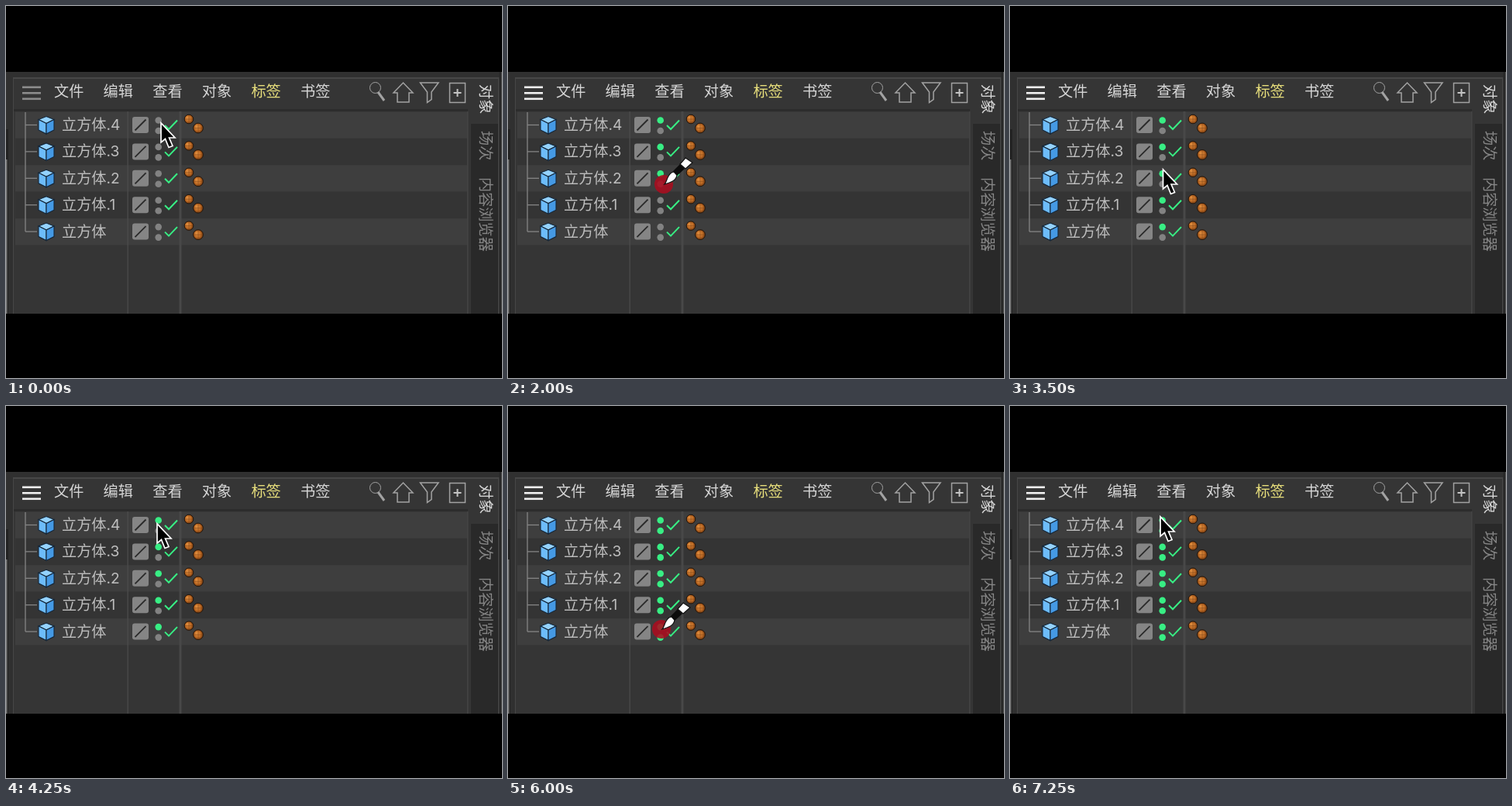
Recreate the animation shown at these times as an HTML page with a canvas. Size 640 px wide and 480 px high, loop 8000 ms.

```html
<!DOCTYPE html>
<html lang="zh-CN">
<head>
<meta charset="utf-8">
<style>
html, body { margin: 0; width: 100%; height: 100%; overflow: hidden; background: #000; }
canvas { display: block; }
</style>
</head>
<body>
<canvas id="stage" width="640" height="480"></canvas>
<script>
const c = document.getElementById('stage').getContext('2d');
const LOOP = 8000, STEP = 250, ROW = 34.4, TOP = 136.5;
const GREEN = '#38ee84', GREY = '#828282', LINE = '#a2a2a2';

// pointer path: step, x, y
const path = [
  [0, 200, 151], [2, 200, 174], [4, 196, 144], [6, 196, 144], [7, 199, 176],
  [8, 202, 230], [10, 202, 304], [11, 202, 304], [12, 200, 289], [13, 200, 264],
  [15, 195, 158], [16, 193, 145], [17, 195, 152], [19, 197, 160], [22, 197, 160],
  [24, 199, 288], [26, 197, 297], [28, 195, 165], [29, 194, 143], [32, 194, 143]
];

// each stroke paints one column of dots: steps of press and release, ring centre
const strokes = [
  { down: 6, up: 12, x: 201, y: 305 },
  { down: 22, up: 26, x: 197, y: 299 }
];

function pointer(n) {
  const i = path.findIndex(p => p[0] > n);
  const [a, x, y] = path[i - 1], [b, u, v] = path[i];
  const k = (n - a) / (b - a);
  return [x + (u - x) * k, y + (v - y) * k];
}

function lit(stroke, n, y) {
  if (n < stroke.down) return 0;
  return n < stroke.up ? Math.floor((y - 140) / ROW) + 1 : 5;
}

function box(x, y, w, h, color) {
  c.fillStyle = color;
  c.fillRect(x, y, w, h);
}

function shape(d, fill, stroke, width = 1.5) {
  const p = new Path2D(d);
  if (fill) { c.fillStyle = fill; c.fill(p); }
  if (stroke) { c.strokeStyle = stroke; c.lineWidth = width; c.stroke(p); }
}

function disc(x, y, r, fill, stroke, width = 1) {
  c.beginPath();
  c.arc(x, y, r, 0, 7);
  if (fill) { c.fillStyle = fill; c.fill(); }
  if (stroke) { c.strokeStyle = stroke; c.lineWidth = width; c.stroke(); }
}

function at(x, y, draw) {
  c.save();
  c.translate(x, y);
  draw();
  c.restore();
}

function text(s, x, y, color, turned) {
  at(x, y, () => {
    if (turned) c.rotate(Math.PI / 2);
    c.font = '19.2px Inter, "Noto Sans CJK SC", sans-serif';
    c.fillStyle = color;
    c.fillText(s, 0, 0);
  });
}

function panel() {
  box(0, 0, 640, 480, '#000');
  box(0, 85, 640, 312, '#303030');
  box(9, 92, 627, 305, '#474747');
  box(10, 94, 626, 303, '#353535');
  box(10, 133, 586, 3, '#2c2c2c');
  box(600, 152, 35, 245, '#292929');
  box(635, 92, 1.5, 305, '#484848');
  box(636.5, 85, 2.5, 312, '#272727');
  box(639, 85, 1, 312, '#555');
  box(0, 159, 3, 238, '#222');
  box(0, 198, 1.5, 199, '#777');
}

function toolbar(bright) {
  for (let i = 0; i < 3; i++) box(21, 103.5 + i * 7.5, 24, 2.6, bright ? '#f0f0f0' : '#8c8c8c');
  ['文件', '编辑', '查看', '对象', '标签', '书签'].forEach((s, i) =>
    text(s, 62 + i * 63.6, 117, i === 4 ? '#e8df7c' : '#d6d6d6'));
  disc(476.5, 105.5, 7, null, LINE);
  shape('M480 111L488 122', null, LINE, 3);
  shape('M500 112L512.5 99L525 112H520V124H505V112Z', null, LINE);
  shape('M534.5 99H558L549 111V120.5L543.5 124.5V111Z', null, LINE);
  c.strokeRect(572.5, 99.5, 20, 25);
  shape('M577.5 112h10m-5-5v10', null, '#c4c4c4', 2);
  text('对象', 612, 101, '#d8d8d8', true);
  text('场次', 612, 161, '#858585', true);
  text('内容浏览器', 612, 221, '#858585', true);
}

function ball(x, y, r) {
  const g = c.createRadialGradient(x - 2, y - 2, 1, x, y, r);
  g.addColorStop(0, '#dc8a3c');
  g.addColorStop(0.6, '#bd6a24');
  g.addColorStop(1, '#70380f');
  disc(x, y, r, g, '#24170d');
  shape(`M${x - r + 1} ${y}H${x + r - 1}M${x} ${y - r + 1}V${y + r - 1}`, null, '#6d3a1588', 0.8);
}

function cube() {
  const edge = '#142638';
  shape('M0-11L10-7L0-2L-10-7Z', '#94d2ff', edge, 1.1);
  shape('M-10-7L0-2V11.5L-10 6.5Z', '#6dbcfa', edge, 1.1);
  shape('M10-7L0-2V11.5L10 6.5Z', '#4599e4', edge, 1.1);
}

function row(i, upper, lower) {
  const mid = 153.5 + i * ROW;
  shape(`M25 ${mid}H40`, null, '#858585', 1.3);
  at(52, mid, cube);
  text('立方体' + (i < 4 ? '.' + (4 - i) : ''), 72, mid + 6.5, '#bebebe');
  c.beginPath();
  c.roundRect(163, mid - 10.5, 21, 21, 3);
  c.fillStyle = '#858585';
  c.fill();
  shape(`M166.5 ${mid + 7}l14-14`, null, '#292929', 1.8);
  disc(196.7, mid - 6, 4.3, upper ? GREEN : GREY);
  disc(196.7, mid + 7.5, 4.3, lower ? GREEN : GREY);
  shape(`M205 ${mid + 0.5}l5 5l11-11.5`, null, GREEN, 2);
  ball(236, mid - 7.5, 5.8);
  ball(248, mid + 4, 6.4);
}

function list(upper, lower) {
  for (let i = 0; i < 5; i++) box(12, TOP + i * ROW, 583, ROW, i % 2 ? '#343434' : '#3e3e3e');
  box(156.5, 136, 1.2, 261, '#4d4d4d');
  box(223.5, 136, 3, 261, '#484848');
  box(595, 136, 1.5, 261, '#444');
  shape(`M25 137V${153.5 + 4 * ROW}`, null, '#858585', 1.3);
  for (let i = 0; i < 5; i++) row(i, i < upper, i < lower);
}

function arrow() {
  shape('M0 0V25L5.5 20.5L10 31.5L15 29.5L10.5 19H18Z', '#000', '#fff', 1.7);
}

function brush() {
  shape('M0 0C3-3 3-11 9-15L12-16L16-12C15-4 7-2 0 0Z', '#fff', '#111', 1.2);
  shape('M11-17L20-26L26-20L16-11Z', '#0c0c0c');
  shape('M20-26L27-34L36-28L27-20Z', '#fff', '#111', 1.2);
}

function ring(stroke, age) {
  c.globalAlpha = age ? 0.25 : 0.9;
  disc(stroke.x, stroke.y, 24 + age * 38, '#c4141408', '#c81414', 3);
  c.globalAlpha = 1;
}

function draw(t) {
  const n = Math.floor(t / STEP);
  const [x, y] = pointer(n);
  const [upper, lower] = strokes.map(s => lit(s, n, y));
  let tool = arrow;
  panel();
  toolbar(n >= strokes[0].down);
  list(upper, lower);
  for (const s of strokes) {
    const held = n - s.down, age = n - s.up;
    if (held === 0) disc(x - 1, y + 3, 6, '#d20c2ce0');
    if (held > 0 && age < 0) {
      tool = brush;
      disc(x - 1, y, Math.min(13, 8 + held * 2), '#ac0c1edd');
    }
    if (age === 0 || age === 1) ring(s, age);
  }
  at(x, y, tool);
}

function tick() {
  draw(performance.now() % LOOP);
  requestAnimationFrame(tick);
}
tick();
</script>
</body>
</html>
```
